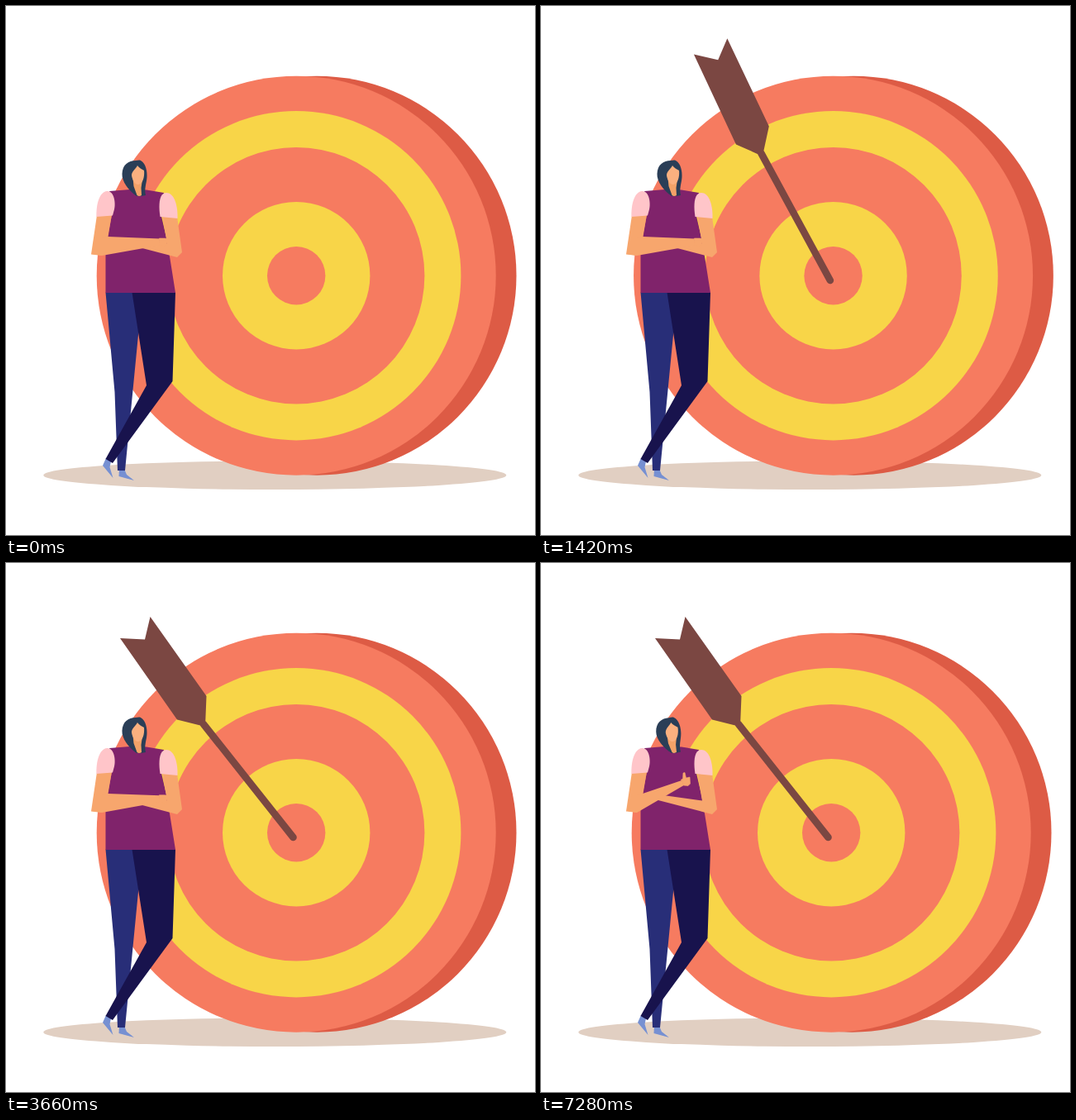
Animation, 640 px wide and 640 px high, one loop 8000 ms. Source, as an HTML page:

```html
<!DOCTYPE html>
<html lang="en">
<head>
<meta charset="utf-8">
<title>On target</title>
<style>
  html, body { margin: 0; height: 100%; overflow: hidden; background: #fff; }
  svg { display: block; width: 100%; height: 100%; }
</style>
</head>
<body>
<svg viewBox="0 0 640 640">
  <ellipse cx="325.3" cy="567.7" rx="280" ry="17.3" fill="#e1cfc2"/>

  <g id="board" fill="#f67b60">
    <circle cx="376" cy="326.2" r="241.5" fill="#dd5b45"/>
    <circle cx="351.2" cy="326.2" r="241.5"/>
    <circle cx="351.2" cy="326.2" r="199.2" fill="#f8d548"/>
    <circle cx="351.2" cy="326.2" r="155.2"/>
    <circle cx="351.2" cy="326.2" r="89.2" fill="#f8d548"/>
    <circle cx="351.2" cy="326.2" r="35.2"/>
  </g>

  <g id="woman">
    <path fill="#7690d2" d="M121 547L127 551 125.5 558 129.5 571 117 556ZM137 560H143L146 567 155 574 136.5 569Z"/>
    <path fill="#282e78" d="M120.5 346.5H166L160 398 144 562H135L131.5 467Z"/>
    <path fill="#18134d" d="M152.5 346.5H205L201.5 454 129 553 120.5 548 170 459Z"/>
    <path fill="#80236b" d="M125 224L150 222 170 222.5 191 226 187 250 194 280 198 303 205 347H120.5V300L123 279 130 243Z"/>
    <g fill="#f7a66d">
      <path d="M110 253L128 252 123.5 279 116 302 103 300.5Z"/>
      <path d="M189 254L207 255 213 298 207 304 138 286 148 281 195 287.5Z"/>
      <path id="forearm"/>
      <g id="hand" stroke="#f7a66d" stroke-width=".6" stroke-linejoin="round">
        <path d="M-2 -4L4 -6 8.5 -7 9 1 6.5 3.5 1 3Z"/>
        <path id="thumb" d="M0 1L.5 -8 2.5 -8.5 4 -2V1Z"/>
      </g>
    </g>
    <g fill="#ffc5c9">
      <path d="M109.5 255C109 240 113 225 122 224C131 223 133 239 131 246L129 253.5Z"/>
      <path d="M186.5 255C184 238 186 226 194 226C203 226 208 240 207.5 257Z"/>
    </g>
    <g id="head">
      <path fill="#2a3e57" d="M158 230C148 223 140 212 140.5 203C141 192 148 187 157 187C159 187 161 186 163 187C169 190 171 200 170.5 207C170 215 167 221 169 229L163.5 230Z"/>
      <path fill="#f3a268" d="M153.5 208L154.5 218 158.5 229Q161 231 164 229L163.5 220 165 210Z"/>
      <path fill="#fbb07f" d="M159 193C161 196 165 198 167 199C168 207 165 216 160 216C155 216 152 208 152 204C153 199 157 197 159 193Z"/>
    </g>
  </g>

  <g id="arrow" fill="#7b4742">
    <path d="M239 195L347.5 332" stroke="#7b4742" stroke-width="8.6" stroke-linecap="round"/>
    <path d="M138 91L168 92.5 174.5 65 242.5 161 241 198 207 189.5Z"/>
  </g>
</svg>
<script>
const [board, arrow, head, forearm, hand, thumb] =
  ['board', 'arrow', 'head', 'forearm', 'hand', 'thumb'].map(id => document.getElementById(id));

const LOOP = 8000, START = 680, CYCLE = 560;
const BEATS = [0, 140, 180, 320, 440];   // uneven drawing steps within a cycle
const HIT = 4, SETTLE = 11, RAISE = 26, LAST = 59;

const mix = (a, b, u) => a + (b - a) * u;
const clamp = u => Math.max(0, Math.min(1, u));
const move = (el, x, y, angle, more = '') =>
  el.setAttribute('transform', `translate(${x} ${y}) rotate(${angle} ${more})`);

function stepAt(t) {
  if (t < START) return -1;
  const cycle = Math.floor((t - START) / CYCLE);
  const phase = (t - START) % CYCLE;
  return Math.min(LAST, cycle * BEATS.length + BEATS.filter(b => b <= phase).length - 1);
}

// Straight flight, then a damped swing of the arrow and a damped shake of the board
function drawArrow(step) {
  const flying = step < HIT;
  const left = flying ? 1 - BEATS[Math.max(0, step)] / BEATS[HIT] : 0;
  const k = Math.max(0, Math.min(step - HIT, SETTLE));
  const shake = 4 * Math.sin(Math.PI * k / 5) * (1 - k / SETTLE) ** 1.5;
  const swing = -10.7 * Math.cos((Math.PI - .335) * (k - 2)) * (1 - (k / SETTLE) ** 3);
  move(board, shake, 0, 0);
  move(arrow, shake - 315.5 * left, -154 * left, flying ? -25.7 : swing, '347.5 332');
  arrow.style.display = step < 0 ? 'none' : '';
}

// The forearm swings about the elbow and shortens while the thumb comes up
function drawWoman(step) {
  const u = clamp((step - RAISE) / 17), raise = u * u * (3 - 2 * u);
  const angle = mix(-4.3, -23.1, raise), a = angle * Math.PI / 180;
  const length = 73.2 - 9.6 * raise ** 2, half = mix(4, 3.3, raise);
  const x = 113 + length * Math.cos(a), y = 291 + length * Math.sin(a);
  const nx = half * Math.sin(a), ny = half * Math.cos(a);
  forearm.setAttribute('d',
    `M123 279L${x + nx} ${y - ny} ${x - nx} ${y + ny} 116 302 104 300 110 280Z`);
  move(hand, x, y, angle + 23.1);
  thumb.setAttribute('transform', `translate(0 -4) scale(1 ${raise})`);
  move(head, 0, 0, -3 * clamp((step - RAISE) / (LAST - RAISE)), '160 228');
}

function frame() {
  const step = stepAt(performance.now() % LOOP);
  drawArrow(step);
  drawWoman(step);
  requestAnimationFrame(frame);
}
frame();
</script>
</body>
</html>
```
